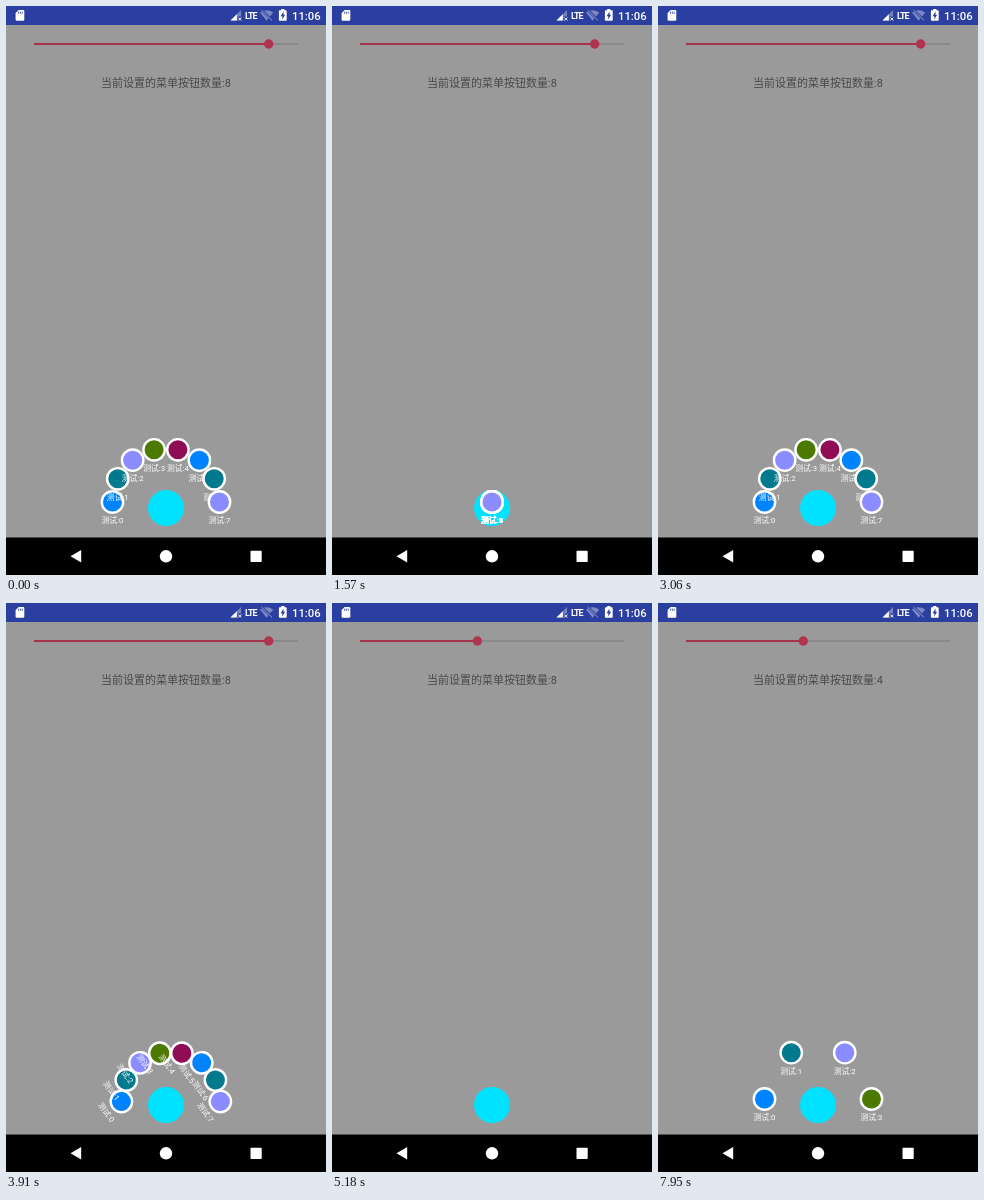
Animation of 320 by 569 pixels, one loop 8000 ms. Source, as an HTML page:

```html
<!DOCTYPE html>
<html lang="zh-CN">
<head>
<meta charset="utf-8">
<title>Arc menu</title>
<style>
  html, body { margin: 0; width: 100%; height: 100%; overflow: hidden; background: #9a9a9a; }
  svg { display: block; width: 100%; height: 100%; }
  text { font-family: Roboto, "Noto Sans CJK SC", "Noto Sans CJK", sans-serif; }
  .caption { font-size: 11px; fill: #484848; text-anchor: middle; }
  .item text { font-size: 7.8px; fill: #fff; text-anchor: middle; }
  .item circle { stroke: #fff; stroke-width: 2.4; }
</style>
</head>
<body>
<svg viewBox="0 0 320 569" preserveAspectRatio="none">
  <rect width="320" height="569" fill="#9a9a9a"/>

  <g id="status" fill="#fff">
    <rect width="320" height="19" fill="#2a3f9f"/>
    <path d="M12.7 4H17.2Q18.3 4 18.3 5V13.8Q18.3 14.8 17.2 14.8H10.6Q9.6 14.8 9.6 13.8V7.1Z"/>
    <path d="M12.6 5.6v2.2M14.4 5.6v2.2M16.2 5.6v2.2" stroke="#2a3f9f" stroke-width=".8"/>
    <path d="M235 4V10.5H231.5V14.5H224.5Z" opacity=".35"/>
    <path d="M230.8 8.2V14.5H224.5Z"/>
    <path d="M232.3 11.5l3 3m0-3l-3 3" stroke="#fff"/>
    <text x="239" y="12.9" font-size="9" font-weight="700" letter-spacing="-1">LTE</text>
    <g opacity=".38">
      <path d="M254 6.6Q260.5 1.8 267.2 6.6L260.6 14.8Z"/>
      <path d="M255.3 3.6L266.5 14.6" stroke="#2a3f9f" stroke-width="2.4"/>
    </g>
    <path d="M255.5 4L266 14.4" stroke="#fff" stroke-opacity=".5"/>
    <path d="M275.2 4.2V3h3.2v1.2h1.5q.8 0 .8.8v9q0 .8-.8.8h-6.2q-.8 0-.8-.8V5q0-.8.8-.8Z"/>
    <path d="M277.5 5.6L274.6 10.2H276.3V13.4L279.1 8.8H277.5Z" fill="#2a3f9f"/>
    <text x="286" y="13.6" font-size="11.3" font-weight="500">11:06</text>
  </g>

  <g id="slider">
    <path d="M28 38H292" stroke="#858585" stroke-width="1.6"/>
    <path id="track" stroke="#a4334c" stroke-width="1.8"/>
    <circle id="thumb" cy="38" fill="#b03450"/>
  </g>
  <text id="caption" class="caption" x="160" y="81"></text>

  <circle cx="160" cy="502" r="18" fill="#00e2ff"/>
  <g id="menu"></g>

  <rect y="531.5" width="320" height="37.5" fill="#000"/>
  <g fill="#fff">
    <path d="M64.5 550.3L75.2 544V556.6Z"/>
    <circle cx="160" cy="550.3" r="6.2"/>
    <rect x="244.5" y="544.8" width="11.2" height="11.2" rx=".8"/>
  </g>
</svg>

<script>
  const LOOP = 8000, HOLD = 500;
  const RADIUS = 53.5, TURN = 720;
  const CLOSE_MS = 880, OPEN_MS = 1150;
  const COLORS = ['#0083ff', '#007a8c', '#8a8cff', '#4c7a00', '#900d55'];
  const $ = id => document.getElementById(id);

  function make(tag, parent, attrs) {
    const el = document.createElementNS('http://www.w3.org/2000/svg', tag);
    for (const key in attrs) el.setAttribute(key, attrs[key]);
    return parent.appendChild(el);
  }

  // Each item turns about the middle of its icon and label.
  const items = Array.from({ length: 8 }, (_, i) => {
    const g = make('g', $('menu'), { class: 'item' });
    make('circle', g, { cy: -6, r: 10.7, fill: COLORS[i % 5] });
    make('text', g, { y: 15.2 }).textContent = '测试:' + i;
    return g;
  });

  // The screen refreshes about five times a second.
  function refresh(t) {
    return t < HOLD ? 0 : HOLD + Math.floor((t - HOLD) / 212.6) * 212.9;
  }

  const accelerate = x => Math.min(1, Math.max(0, x)) ** 2;

  const phases = [
    { at: 0, mode: 'rest' },
    { at: 480, mode: 'close' },
    { at: 1560, mode: 'open' },
    { at: 3665, mode: 'close' },
    { at: 4650, mode: 'hidden' },
    { at: 6660, mode: 'open' }
  ];

  function drawMenu(t, count) {
    const { at, mode } = phases.filter(p => p.at <= t).pop();
    const closing = mode === 'close';
    const p = mode === 'rest' ? 1 : accelerate((t - at) / (closing ? CLOSE_MS : OPEN_MS));
    const r = RADIUS * (closing ? 1 - p : p);
    items.forEach((g, i) => {
      const a = Math.PI * i / (count - 1);
      const x = 160 - r * Math.cos(a), y = 502 - r * Math.sin(a);
      g.setAttribute('transform', `translate(${x} ${y}) rotate(${TURN * p})`);
      g.style.display = mode === 'hidden' || i >= count ? 'none' : '';
    });
  }

  function drawSlider(t) {
    const x = 28 + 264 * (t < 5100 ? 8 : 4) / 9;
    const pressed = t > 5300 && t < 5950;
    $('track').setAttribute('d', `M28 38H${x}`);
    $('thumb').setAttribute('cx', x);
    $('thumb').setAttribute('r', pressed ? 6.4 : 4.7);
  }

  function draw(now) {
    const t = refresh(now % LOOP);
    const count = t < 5300 ? 8 : 4;
    $('caption').textContent = '当前设置的菜单按钮数量:' + count;
    drawSlider(t);
    drawMenu(t, count);
  }

  let start;
  function tick(now) {
    start ??= now;
    draw(now - start);
    requestAnimationFrame(tick);
  }
  draw(0);
  requestAnimationFrame(tick);
</script>
</body>
</html>
```
